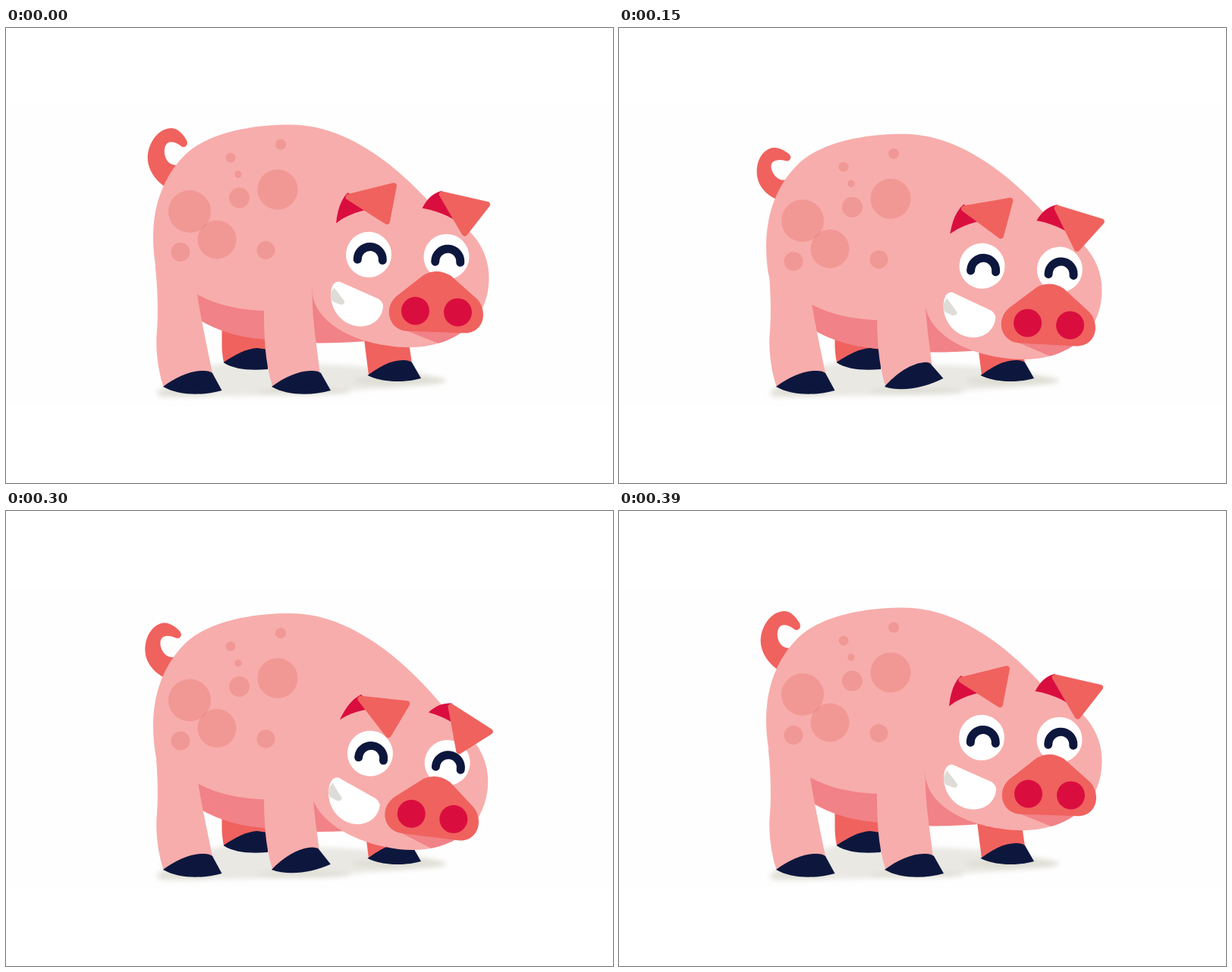
An HTML page without scripts that plays this animation: 800x600 px, repeating every 0.42 s.

```html
<!DOCTYPE html>
<html lang="en">
<head>
<meta charset="utf-8">
<title>Happy pig</title>
<style>
  @property --t { syntax: "<number>"; inherits: true; initial-value: 0; }

  html, body { margin: 0; width: 100%; height: 100%; overflow: hidden; background: #fff; }

  /* --t counts 14 ticks; the bounce goes down in 7 and up in 6, the head lags by 2. */
  svg {
    display: block; width: 100%; height: 100%;
    animation: tick 420ms steps(14) infinite;
    --phase: calc(min(var(--t), 7) * 180deg / 7 + max(var(--t) - 7, 0) * 30deg);
    --lag: calc(var(--t) - 2);
    --lag-phase: calc(min(var(--lag), 0) * 30deg + clamp(0, var(--lag), 7) * 180deg / 7 + max(var(--lag) - 7, 0) * 30deg);
    --dip: calc((1 - cos(var(--phase))) / 2);
    --nod: calc((1 - cos(var(--lag-phase))) / 2);
  }
  @keyframes tick { to { --t: 14; } }

  .bob { transform: translateY(calc(var(--dip) * 15px)); }
  .tail { transform-origin: 241px 187px; transform: scaleY(calc(1 - var(--dip) * .06)) rotate(calc(var(--dip) * -27deg)); }
  .head { transform-origin: 335px 326px; transform: rotate(calc(var(--nod) * 7.8deg)); }
  .ear { transform: rotate(calc(var(--nod) * 21.2deg)); }
  .left { transform-origin: 431px 251px; }
  .right { transform-origin: 541px 231px; }
  .front-hoof { transform-origin: 350px 473px; transform: rotate(calc(pow(max(var(--dip), 0), .57) * -13.3deg)); }

  .skin { fill: #f7adac; }
  .red { fill: #f0625e; }
  .shade { fill: #f18287; }
  .crimson { fill: #d90e3f; }
  .navy { fill: #0d173d; }
  .white { fill: #fff; }
  .flap { fill: #f0625e; stroke: #f0625e; stroke-width: 8; stroke-linejoin: round; }
  .spots { fill: #e0605c; fill-opacity: .28; }
  .smile { fill: none; stroke: #0d173d; stroke-width: 11; stroke-linecap: round; }
</style>
</head>
<body>
<svg viewBox="0 0 800 600">
  <defs>
    <filter id="soft" x="-10%" y="-50%" width="120%" height="200%"><feGaussianBlur stdDeviation="3"/></filter>
    <path id="egg" d="M404 340C404 295 420 265 434 253C455 236 490 228 530 229C590 231 636 268 636.5 322C637 380 590 414 530 414.500C462 414.500 404 385 404 340Z"/>
    <clipPath id="in-egg"><use href="#egg"/></clipPath>
    <g id="eye">
      <circle class="white" r="30"/>
      <path class="smile" d="M-14.5 7v-1a16.5 16.5 0 0 1 33 0v1"/>
    </g>
  </defs>

  <rect y="101" width="800" height="397" fill="#fefefe"/>

  <g filter="url(#soft)">
    <path fill="#e9e8e3" d="M198 480Q230 452 285 442L420 444Q530 448 580 464Q560 472 470 477L380 484L203 487Z"/>
    <g fill="#e0dfd6">
      <ellipse cx="238" cy="481" rx="38" ry="5"/>
      <ellipse cx="392" cy="479" rx="62" ry="5"/>
      <ellipse cx="518" cy="465" rx="62" ry="7"/>
    </g>
  </g>

  <g id="far-legs">
    <path class="red" d="M284.500 380V420Q285 432 287 441L345 440V380Z"/>
    <path class="navy" d="M286.500 441C303 430 318 422.500 331 422L345 424V450C320 452 300 450 286.500 441Z"/>
    <path class="red" d="M470 395L478 458L535 442L528 395Z"/>
    <path class="navy" d="M476.500 458C492 447 506 438 524 438Q531 438 535 441L547 462C530 467 498 469 476.500 458Z"/>
  </g>

  <g class="bob">
    <path class="red tail" d="M209 209C192 197 185 180 187 166C190 146 204 132 218 132C227 132 234 141 238 148C241 154 236 159 231 156C226 152 220 149 214 151C208 154 208 164 210 170C213 179 220 181 227 181L245 215Z"/>
    <path class="shade" d="M240 375Q285 409 350 411C390 417 430 416 475 413L480 340L240 330Z"/>
    <path class="skin" d="M194 275C194 228 212 187 243 161C275 137 325 127.500 375 127.500C447 127.500 518 179 580 255L570 330L404 343L345 373Q290 372 253 352L205 335L197 313Q194 295 194 275Z"/>
    <g class="spots">
      <circle cx="242" cy="242" r="28"/>
      <circle cx="278" cy="279" r="25.500"/>
      <circle cx="358" cy="213" r="26.500"/>
      <circle cx="307.500" cy="224" r="13.500"/>
      <circle cx="296" cy="171" r="6.500"/>
      <circle cx="362" cy="153.500" r="7"/>
      <circle cx="306" cy="193" r="4.700"/>
      <circle cx="230" cy="295.500" r="12.500"/>
      <circle cx="342.500" cy="293" r="12"/>
    </g>
  </g>

  <g id="near-legs">
    <path class="skin" d="M196.500 313C200 340 201 380 198.500 405C197 430 202 458 208 474L273 470L272 455C265 420 257 385 251 345L212 335Z"/>
    <path class="navy" d="M207 473C224 460 245 451 261 452Q268 452 272 455L284.500 478C260 485 228 485 207 473Z"/>
    <path class="skin" d="M340 330V373C340 405 341 440 351 472L414 460Q414 455 408 410Q403.500 375 403.500 345V330Z"/>
    <path class="navy front-hoof" d="M350 473C367 460 388 451 404 452Q411 452 415 455L428 478C403 485 371 485 350 473Z"/>
  </g>

  <g class="bob">
    <g class="head">
      <path class="crimson ear left" d="M433 254Q432 226 443 212L480 225L500 245L470 250Z"/>
      <path class="crimson ear right" d="M545 231Q552 210 568 204L600 240L595 262L560 250Z"/>
      <use href="#egg" class="skin"/>

      <use href="#eye" x="477" y="294"/>
      <use href="#eye" x="579.500" y="293.300"/>

      <path class="flap ear left" d="M445 217.500L502 195.500L499 243Z"/>
      <path class="flap ear right" d="M569 208.500L629.500 214.500L605 255.500Z"/>

      <path class="white" d="M440 331L492 352Q500 357 498 365C496 379 484 389 468 389C446 388 431 371 429 351C428 337 433 330 440 331Z"/>
      <path fill="#dddcd6" d="M433 339L447.500 357Q447 362 441 361L431 357Q426 348 433 339Z"/>

      <path class="shade" clip-path="url(#in-egg)" d="M526 391L573 408L582 414L612 388Z"/>
      <path class="red" d="M551 318Q568 308 586 318L621 347C638 363 632 393 606 393H532C506 393 498 363 516 347Z"/>
      <circle class="crimson" cx="541" cy="366" r="18.500"/>
      <circle class="crimson" cx="597" cy="366" r="18.500"/>
    </g>
  </g>
</svg>
</body>
</html>
```
